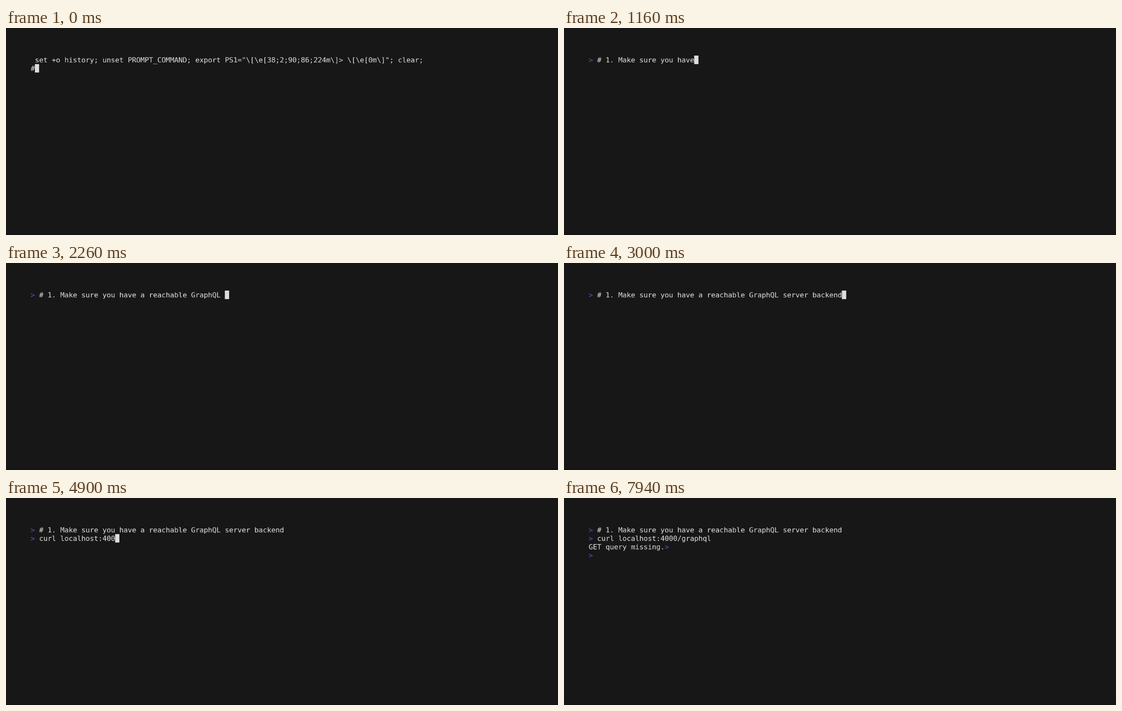
Animation of 1222x458 px, one loop 8 s. Source, as an HTML page with a canvas:

```html
<!DOCTYPE html>
<html lang="en">
<head>
<meta charset="utf-8">
<title>Terminal session</title>
<style>
html, body { margin: 0; width: 100%; height: 100%; overflow: hidden; background: #171717; }
canvas { display: block; width: 1222px; height: 458px; }
</style>
</head>
<body>
<canvas id="stage" width="1222" height="458"></canvas>
<script>
const LOOP = 8000;
const BG = '#171717', FG = '#dddddd', PROMPT = '#5a56e0', EDGE = '#141414';
const CELL_W = 13, CELL_H = 26, LEFT = 76, TOP = 85, BASE = 21;
const SCALE = 1222 / 1700;

const SETUP = ' set +o history; unset PROMPT_COMMAND; export PS1="\\[\\e[38;2;90;86;224m\\]> \\[\\e[0m\\]"; clear;';
const NOTE = '# 1. Make sure you have a reachable GraphQL server backend';
const COMMAND = 'curl localhost:4000/graphql';
const REPLY = 'GET query missing.';

// [time, cursor column] pairs; typing is even between them
const NOTE_KEYS = [[60, 3], [860, 19], [880, 20], [1160, 25], [1200, 26], [1680, 35],
  [1740, 36], [2260, 46], [2300, 47], [2520, 51], [2560, 52], [3000, 60]];
const COMMAND_KEYS = [[3980, 2], [4020, 3], [4740, 17], [4780, 18], [4900, 20], [5360, 29]];
const BLINK_OFF = [[3540, 3960], [5900, 6280], [6880, 7420], [7940, LOOP]];

const view = document.getElementById('stage').getContext('2d');
const buffer = document.createElement('canvas');
buffer.width = 1700;
buffer.height = 640;
const ctx = buffer.getContext('2d');

function columnAt(keys, t) {
  let col = keys[0][1];
  for (let i = 1; i < keys.length; i++) {
    const [t0, c0] = keys[i - 1], [t1, c1] = keys[i];
    for (let c = c0 + 1; c <= c1; c++) {
      const due = t0 + Math.round((t1 - t0) * (c - c0) / (c1 - c0) / 20) * 20;
      if (t >= due) col = c;
    }
  }
  return col;
}

function write(text, col, row, color = FG) {
  ctx.fillStyle = color;
  [...text].forEach((ch, i) => {
    if (ch !== ' ') ctx.fillText(ch, LEFT + (col + i) * CELL_W, TOP + row * CELL_H + BASE);
  });
}

function promptLine(text, row) {
  write('>', 0, row, PROMPT);
  write(text, 2, row);
}

// Writes the screen at time t and returns the cursor cell
function writeScreen(t) {
  if (t < 60) {
    write(SETUP, 0, 0);
    write('#', 0, 1);
    return [1, 1];
  }
  const noteCol = columnAt(NOTE_KEYS, t);
  promptLine(NOTE.slice(0, noteCol - 2), 0);
  if (t < 3960) return [noteCol, 0];
  if (t < 3980) return [0, 1];

  const commandCol = columnAt(COMMAND_KEYS, t);
  promptLine(COMMAND.slice(0, commandCol - 2), 1);
  if (t < 6280) return [commandCol, 1];
  if (t < 6300) return [0, 2];

  write(REPLY, 0, 2);
  if (t < 6320) return [18, 2];
  write('>', 18, 2, PROMPT);
  if (t < 6340) return [20, 2];
  if (t < 6360) return [0, 3];
  promptLine('', 3);
  return [2, 3];
}

function draw(t) {
  ctx.fillStyle = BG;
  ctx.fillRect(0, 0, buffer.width, buffer.height);
  ctx.font = '22px "DejaVu Sans Mono", monospace';
  ctx.textBaseline = 'alphabetic';

  const [col, row] = writeScreen(t);
  if (!BLINK_OFF.some(([from, to]) => t >= from && t < to)) {
    ctx.fillStyle = FG;
    ctx.fillRect(LEFT + col * CELL_W, TOP + row * CELL_H, CELL_W, CELL_H);
  }

  view.imageSmoothingQuality = 'high';
  view.drawImage(buffer, 0, 0, buffer.width * SCALE, buffer.height * SCALE);
  view.fillStyle = EDGE;
  view.fillRect(0, 454, 1222, 4);
}

const start = performance.now();
function tick() {
  draw((performance.now() - start) % LOOP);
  requestAnimationFrame(tick);
}
tick();
</script>
</body>
</html>
```
